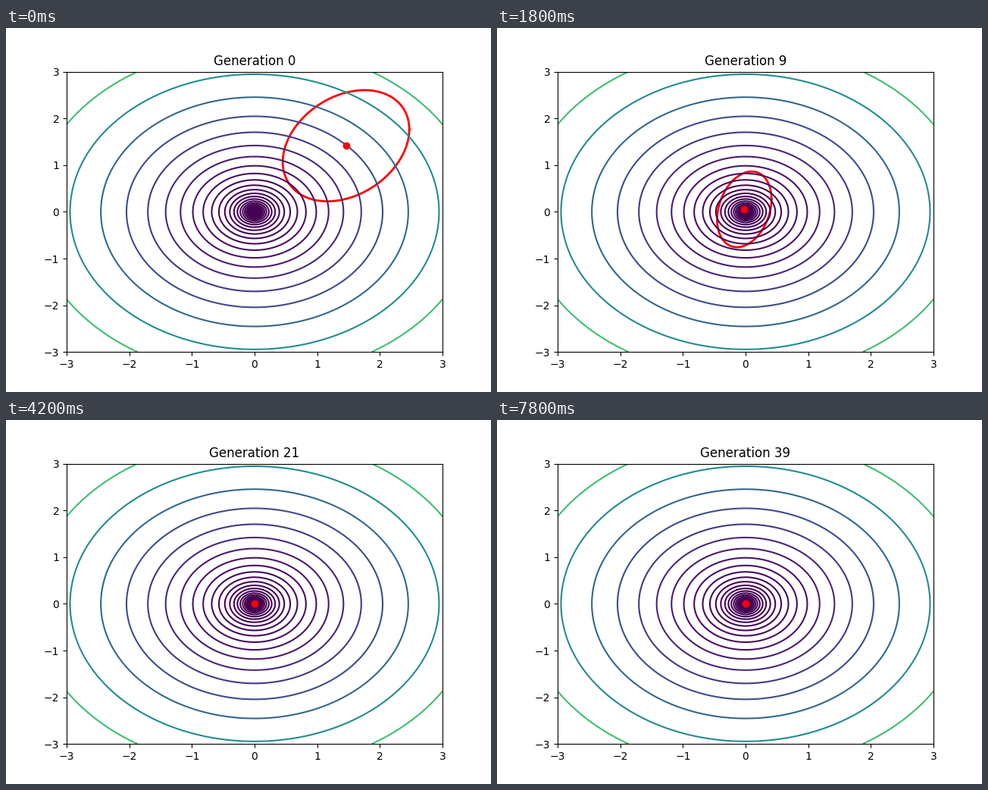
Write a matplotlib script that moves like this. It is 640 by 480 pixels and loops after 8000 ms.

```python
import numpy as np
import matplotlib.pyplot as plt
from matplotlib.animation import FuncAnimation

GENERATIONS = 40
STEP_MS = 200

# Key generations between which the ellipse shrinks exponentially
KEY_GENS = [0, 5, 9, 17, 39]
HALF_X = [1.01, 0.907, 0.434, 0.245, 0.006]
HALF_Y = [1.19, 1.177, 0.81, 0.27, 0.006]
TILT = [0.293, 0.698, 0.27, 0.15, 0]


def mean_at(gen):
    """Damped path from the starting point to the minimum."""
    x = 1.46 * np.exp(-0.47 * gen) * np.cos(np.pi * gen / 10)
    y = 1.415 * np.exp(-0.365 * gen)
    return x, y


def shrink(gen, sizes):
    return np.exp(np.interp(gen, KEY_GENS, np.log(sizes)))


def ellipse_at(gen):
    mx, my = mean_at(gen)
    rho = np.interp(gen, KEY_GENS, TILT)
    t = np.linspace(0, 2 * np.pi, 200)
    x = mx + shrink(gen, HALF_X) * np.cos(t)
    y = my + shrink(gen, HALF_Y) * np.cos(t - np.arccos(rho))
    return x, y


fig, ax = plt.subplots(figsize=(6.4, 4.8), dpi=100)

axis = np.linspace(-3, 3, 200)
gx, gy = np.meshgrid(axis, axis)
cost = gx ** 2 + gy ** 2
ax.contour(gx, gy, cost, levels=np.geomspace(cost.min(), cost.max(), 30))

spread, = ax.plot([], [], color="red", lw=2, zorder=1)
mean, = ax.plot([], [], "ro", zorder=2.2)
title = ax.set_title("Generation 0")
ax.set_xlim(-3, 3)
ax.set_ylim(-3, 3)


def draw(gen):
    mx, my = mean_at(gen)
    spread.set_data(*ellipse_at(gen))
    mean.set_data([mx], [my])
    title.set_text(f"Generation {gen}")
    return spread, mean, title


anim = FuncAnimation(fig, draw, frames=GENERATIONS, interval=STEP_MS,
                     init_func=lambda: draw(0), repeat=True, repeat_delay=0)
plt.show()
```
